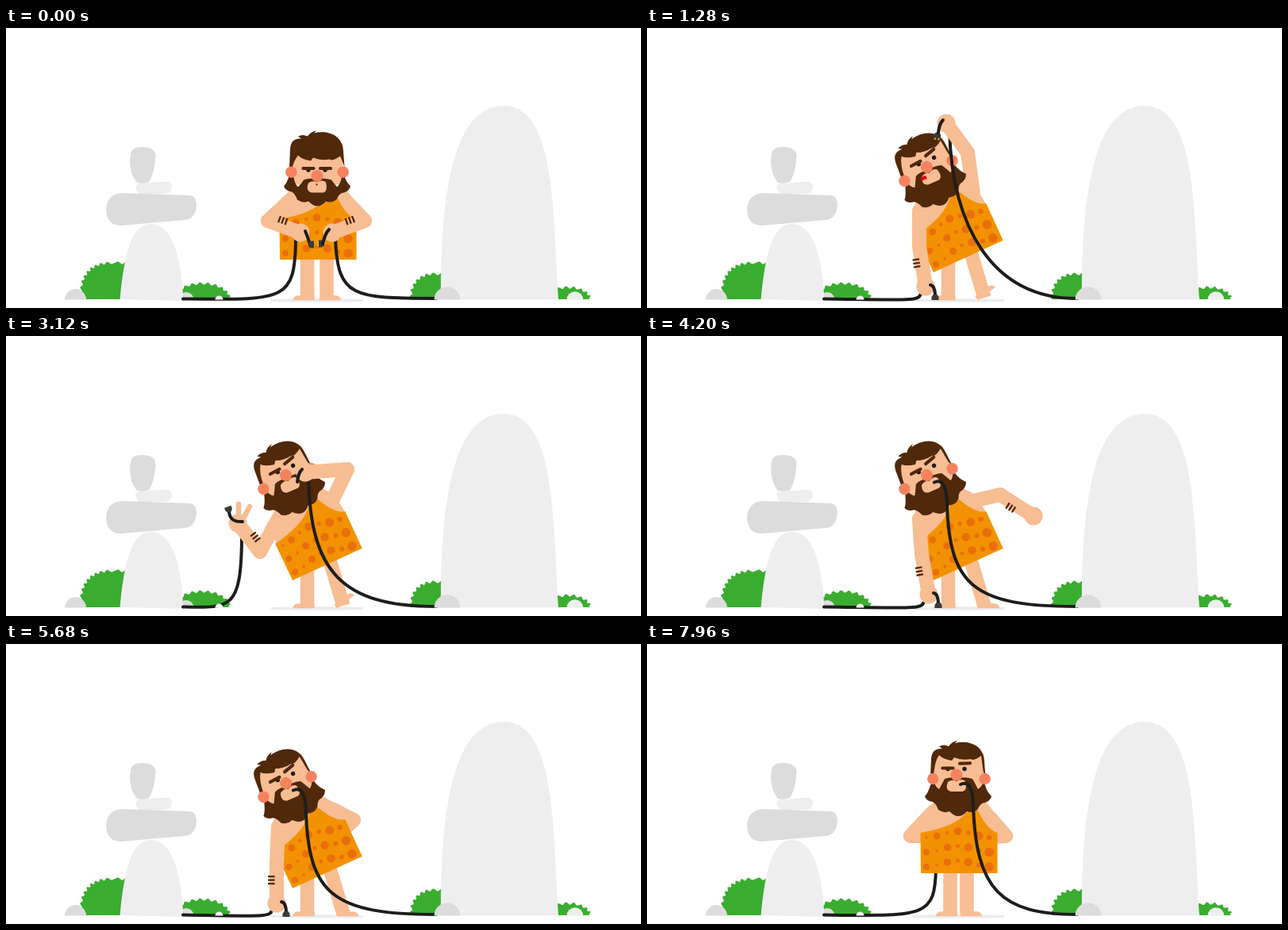
Recreate the animation shown at these times as an HTML page with a canvas. Size 800x353 px, loop 8 s.

```html
<!DOCTYPE html>
<html lang="en">
<head>
<meta charset="utf-8">
<title>Caveman with cables</title>
<style>
html, body { margin: 0; width: 100%; height: 100%; overflow: hidden; background: #fff; }
canvas { display: block; width: 800px; height: 353px; }
</style>
</head>
<body>
<canvas id="stage"></canvas>
<script>
const LOOP = 8000, GROUND = 341.5;
const PLUGGED = 1650, RELEASED = 3420, ARM_BACK = 3600, BEHIND_BACK = 6240;
const SKIN = '#f7bd93', HAIR = '#50280a', ORANGE = '#f39200', SPOT = '#ea6f0b',
  CABLE = '#1d1d1b', GREEN = '#3aad30', PALE = '#eeeeee', GREY = '#dcdcdc', BLUSH = '#f5825f';

const canvas = document.getElementById('stage');
const ctx = canvas.getContext('2d');
const ratio = window.devicePixelRatio || 1;
canvas.width = 800 * ratio;
canvas.height = 353 * ratio;

// Poses: only joints that change are listed, the rest follows from lean and slump.
const rest = { lean: 0, slump: 0, toe: 0, open: 0, wink: 0,
  elbowL: [332, 242], handL: [370, 274], elbowR: [452, 242], handR: [428, 244] };
const wink = { ...rest, wink: 1 };
const hold = { ...rest, slump: 1, elbowL: [330, 243], handL: [371, 258], elbowR: [452, 243], handR: [411, 258] };
const raise = { ...rest, lean: 1, toe: 1, elbowL: [343, 275], handL: [351, 326], elbowR: [404, 157], handR: [377, 120] };
const bite = { ...raise, elbowR: [430, 168], handR: [377, 172] };
const lift = { ...bite, open: 1, elbowL: [320, 272], handL: [292, 236] };
const release = { ...bite, toe: 0, elbowL: [346, 275], handL: [355, 326], elbowR: [424, 160], handR: [440, 125] };
const reach = { ...release, elbowR: [445, 200], handR: [487, 227] };
const hip = { ...reach, elbowL: [341, 278], handL: [341, 327], elbowR: [438, 222], handR: [416, 242] };

const moves = [
  { from: 40, to: 720, pose: raise }, { from: 1340, to: 1700, pose: bite },
  { from: 2520, to: 3000, pose: lift }, { from: 3400, to: 3780, pose: release },
  { from: 3780, to: 4200, pose: reach }, { from: 4240, to: 4680, pose: hip },
  { from: 5940, to: 6460, pose: rest }, { from: 7600, to: 7780, pose: wink }
];

const mix = (a, b, k) => Array.isArray(a) ? a.map((v, i) => mix(v, b[i], k)) : a + (b - a) * k;
const ease = k => (1 - Math.cos(Math.PI * Math.min(1, Math.max(0, k)))) / 2;

function poseAt(t) {
  let pose = hold;
  for (const move of moves) {
    if (t < move.from) break;
    const k = ease((t - move.from) / (move.to - move.from));
    pose = Object.fromEntries(Object.keys(pose).map(key => [key, mix(pose[key], move.pose[key], k)]));
  }
  return pose;
}

function fill(path, colour) {
  ctx.fillStyle = colour;
  ctx.fill(typeof path === 'string' ? new Path2D(path) : path);
}
function dot(x, y, r, colour) {
  ctx.fillStyle = colour;
  ctx.beginPath();
  ctx.arc(x, y, r, 0, 7);
  ctx.fill();
}
function stroke(d, colour, width, cap = 'round') {
  ctx.strokeStyle = colour;
  ctx.lineWidth = width;
  ctx.lineCap = cap;
  ctx.lineJoin = 'round';
  ctx.stroke(new Path2D(d));
}
function placed(x, y, degrees, draw) {
  ctx.save();
  ctx.translate(x, y);
  ctx.rotate(degrees * Math.PI / 180);
  draw();
  ctx.restore();
}
function mapPoint([ox, oy, degrees], x, y) {
  const a = degrees * Math.PI / 180, c = Math.cos(a), s = Math.sin(a);
  return [ox + c * x - s * y, oy + s * x + c * y];
}

// A dome with a wavy rim; a low power makes it boxier.
function bush(cx, rx, ry, power) {
  const rim = new Path2D(), waves = Math.round((rx + ry) / 5);
  for (let i = 0; i <= 120; i++) {
    const a = Math.PI * i / 120, c = Math.cos(a);
    const swell = 1.5 * Math.sin(2 * waves * a);
    rim.lineTo(cx - Math.sign(c) * Math.abs(c) ** power * (rx + swell),
      342 - Math.sin(a) ** power * (ry + swell));
  }
  fill(rim, GREEN);
}
function pebble(cx, r, colour) {
  fill(`M${cx - r} 342.5A${r} ${r} 0 0 1 ${cx + r} 342.5z`, colour);
}

function drawScenery() {
  bush(137, 43, 46, .75);
  bush(247, 35, 20, 1);
  bush(541, 31, 32, .85);
  bush(708, 28, 15, 1);
  pebble(87.5, 13.5, GREY);
  pebble(227, 9.5, GREY);
  pebble(716.8, 10.3, PALE);
  fill('M143.5 342C150 270 163 247 182 247C205 247 220 275 223.5 344z', PALE);
  fill('M170 196L203 193.5Q209 194 209 201Q208 209 200 209L168 210Q163 203 163.5 199Q165 196 170 196z', PALE);
  fill('M145 208L232 211Q240 212 240 224Q238 241 225 242L146 249Q127 250 126 229Q127 210 145 208z', GREY);
  fill('M157 159Q158 150 171 150Q188 150 188.5 161Q187 184 180 194Q173 197 165 195Q156 185 156 166z', GREY);
  fill('M548 342.5C548 250 553 98 627 98C692 98 689 230 696 342.5z', PALE);
  fill('M334 342Q392 340 450 342V345Q392 346 334 345z', '#ececee');
}

function drawLegs({ lean, slump, toe }) {
  const leftX = 382 - 2.5 * Math.max(lean, slump);
  const foot = new Path2D('M0 0V-6H21Q27 -5 27 0z');
  stroke(`M${leftX} 283V342`, SKIN, 17.5, 'butt');
  stroke(`M${403 + 5 * lean + slump} 283L${403 + 22 * lean + slump} 340`, SKIN, 17.5, 'butt');
  placed(leftX + 9, 343.2, 0, () => { ctx.scale(-1, 1); fill(foot, SKIN); });
  placed(395 + 22 * lean, 343.2, -37 * toe, () => fill(foot, SKIN));
}

function drawSpots() {
  for (let column = 0; column < 7; column++) {
    for (let row = 0; row < 3; row++) {
      const big = (column % 2 === 0) === (row > 0);
      const y = 243 + 4 * Math.cos(column * Math.PI / 3) + 18.5 * row;
      dot(352 + 13.2 * column, y, (big ? 4.2 : 1.7) + .27 * column, SPOT);
    }
  }
}

function drawBody(body) {
  const tunic = new Path2D('M344.5 241C372 236 394 229 406 211L417 213Q428 237 441.5 241V292H345z');
  placed(...body, () => {
    ctx.translate(-345, -292);
    fill('M360 203L345 241H441L438 216L428 203z', SKIN);
    fill(tunic, ORANGE);
    ctx.clip(tunic);
    drawSpots();
  });
}

// The sign of side tells on which edge the bands sit; 0 hides them.
function drawForearm([ex, ey], [hx, hy], side) {
  stroke(`M${ex} ${ey}L${hx} ${hy}`, SKIN, 18);
  dot(hx, hy, 11.5, SKIN);
  const length = Math.hypot(hx - ex, hy - ey) || 1;
  const ux = (hx - ex) / length, uy = (hy - ey) / length;
  for (let step = -4.5; side && step <= 4.5; step += 4.5) {
    const x = ex + ux * (length * .4 + step), y = ey + uy * (length * .4 + step);
    const nx = -uy * side, ny = ux * side;
    stroke(`M${x + nx * 2.5} ${y + ny * 2.5}L${x + nx * 11} ${y + ny * 11}`, HAIR, 2.3, 'butt');
  }
}

function drawPlug(x, y, degrees, prongs) {
  placed(x, y, degrees, () => {
    if (prongs) stroke('M3 -2.2H7M3 2.2H7', '#f5c400', 2, 'butt');
    fill('M-2 -2.5L1 -4.5H5V4.5H1L-2 2.5z', '#3b3b3a');
  });
}

function drawLeftArm(t, { elbowL, handL, open, slump }, body) {
  const [hx, hy] = handL, [sx, sy] = mapPoint(body, 16, -78);
  const endX = hx - 6 + 11 * open, endY = hy + 8 + 12 * open;
  stroke(`M223 ${GROUND}C${endX - 14} 343 ${endX - 1} 345 ${endX} ${endY}`, CABLE, 4);
  stroke(`M${sx} ${sy}L${elbowL}`, SKIN, 18);
  if (t > BEHIND_BACK) return stroke(`M${elbowL}L352 242`, SKIN, 18);
  drawForearm(elbowL, handL, slump > .5 ? -1 : 1);
  if (open) {
    stroke(`M${hx + 1} ${hy - 4}v${-20 * open}M${hx + 6} ${hy - 4}l${9 * open} ${-17 * open}`, SKIN, 6.5);
  }
  const tipX = hx + 12 - 23 * open, tipY = hy + 12 + 3 * slump - 28 * open;
  stroke(`M${hx + 6} ${hy - 2}Q${tipX - 3 * slump} ${hy - 1 + 6 * slump} ${tipX} ${tipY}`, CABLE, 4);
  drawPlug(tipX, tipY, 90 - 90 * slump - 200 * open, false);
}

function drawRightArmBack(t, { elbowR, handR }, body) {
  const [sx, sy] = mapPoint(body, 87, -70);
  stroke(`M${sx} ${sy}L${elbowR}`, SKIN, 18);
  if (t >= ARM_BACK) drawForearm(elbowR, handR, t < 4480 ? 1 : 0);
}

function drawRightArmFront(t, { elbowR, handR, slump }) {
  if (t >= ARM_BACK) return;
  const [hx, hy] = handR;
  drawForearm(elbowR, handR, slump > .2 ? 1 : 0);
  if (t > RELEASED) return;
  if (t < PLUGGED) drawPlug(hx - 11 - slump, hy + 14, 98 + 82 * slump, true);
  stroke(`M${hx - 4} ${hy - 4}Q${hx - 9} ${hy + 1} ${hx - 10 - 2 * slump} ${hy + 12 + 2 * slump}`, CABLE, 4);
}

// The longer the drop, the straighter the cable hangs.
function drawRightCable(t, { handR, wink }, head) {
  let x = handR[0] + 4, y = handR[1] + 8, start = `M${x} ${y}`;
  if (t > RELEASED) {
    const [mx, my] = mapPoint(head, 5 - 2 * wink, 7);
    x = mx + 16;
    y = my + 25;
    start = `M${mx} ${my}Q${x - 1} ${my - 7} ${x} ${y}`;
  }
  const drop = GROUND - y;
  stroke(`${start}C${x + 3} ${y + drop * (1.2 - .003 * drop)} ${x + 5 + .22 * drop} 341 542 341`, CABLE, 4);
}

function drawHead(t, { lean, slump, wink }, head) {
  const down = 14 * slump, fringe = 13 * slump;
  const cheek = 183 + .7 * down, lip = 170 + down, ear = 170 + .3 * down;
  placed(...head, () => {
    ctx.translate(-392, -170);
    fill('M361 138H424.5V190H361z', SKIN);
    fill(`M361 172L357 178Q354 188 350 192Q352 198 360 199Q364 201 367 209Q374 214 381 211
      Q387 217 392 217Q398 217 403 211Q411 214 417 208Q420 200 426 200Q433 197 434 192
      Q428 186 426 178L424.5 172Q422 ${cheek - 3} 417 ${cheek}Q412 ${lip + 3} 410 ${lip}
      Q402 ${lip - 3} 392 ${lip - 1}Q382 ${lip - 3} 375 ${lip}Q373 ${lip + 4} 368 ${cheek}
      Q363 ${cheek - 3} 361 172z`, HAIR);
    fill(`M357 168L358 145C359 134 364 132 372 132L368 129Q374 126 380 129Q384 123 391 122
      Q389 124 388 125C405 121 424 127 425 148L426.5 168L423.5 160L421 ${141 + fringe}
      Q411 ${148 + fringe} 408 ${145 + fringe}Q396 ${147 + fringe} 387 ${143 + fringe}
      L384 ${147 + fringe}Q372 ${145 + fringe} 368 ${140 + fringe}Q362 ${148 + fringe} 361 168z`, HAIR);
    dot(359.3 + wink, ear, 7.2, BLUSH);
    dot(424.7 + wink, ear, 7.2, BLUSH);
    ctx.translate(-2 * wink, down);
    fill('M381 174Q386 170 392 173Q399 169 403 173Q406 184 400 186H385Q377 184 381 174z', SKIN);
    if (slump > .2) dot(391.5, 175.8, 1.1, HAIR);
    if (t > 800 && t < PLUGGED) fill('M379 176Q383 172 387 175L386 179Q382 177 379 180z', '#e3000f');
    for (const x of [381, 402]) dot(x + 3 * lean, 157.5, 2.7, CABLE);
    const brow = 'M-6.5 0H6.5';
    placed(381, 155.5 + wink, -5 * lean, () => stroke(brow, HAIR, 4.2));
    placed(402.5, 155.5 - 6 * lean - 5 * wink, -17 * lean - 2 * wink, () => stroke(brow, HAIR, 4.2));
    dot(392, 165, 7.5, BLUSH);
  });
}

function drawScene(t) {
  ctx.setTransform(ratio, 0, 0, ratio, 0, 0);
  ctx.fillStyle = '#fff';
  ctx.fillRect(0, 0, 800, 353);
  drawScenery();

  const pose = poseAt(t), { lean, slump } = pose;
  const body = [345 + 16 * lean, 289 + 19 * lean + 3 * slump, -24.7 * lean];
  const head = [392 - 37.5 * lean, 170 + 10 * lean + 7.5 * slump, -23 * lean];
  const armBehind = t > BEHIND_BACK;
  if (armBehind) drawLeftArm(t, pose, body);
  drawRightArmBack(t, pose, body);
  drawLegs(pose);
  drawBody(body);
  if (!armBehind) drawLeftArm(t, pose, body);
  drawHead(t, pose, head);
  drawRightCable(t, pose, head);
  drawRightArmFront(t, pose);

  pebble(268.5, 5, '#f4f4f4');
  pebble(555.8, 16.3, GREY);
}

const begin = performance.now();
function frame(now) {
  drawScene(Math.max(0, now - begin) % LOOP);
  requestAnimationFrame(frame);
}
drawScene(0);
requestAnimationFrame(frame);
</script>
</body>
</html>
```
